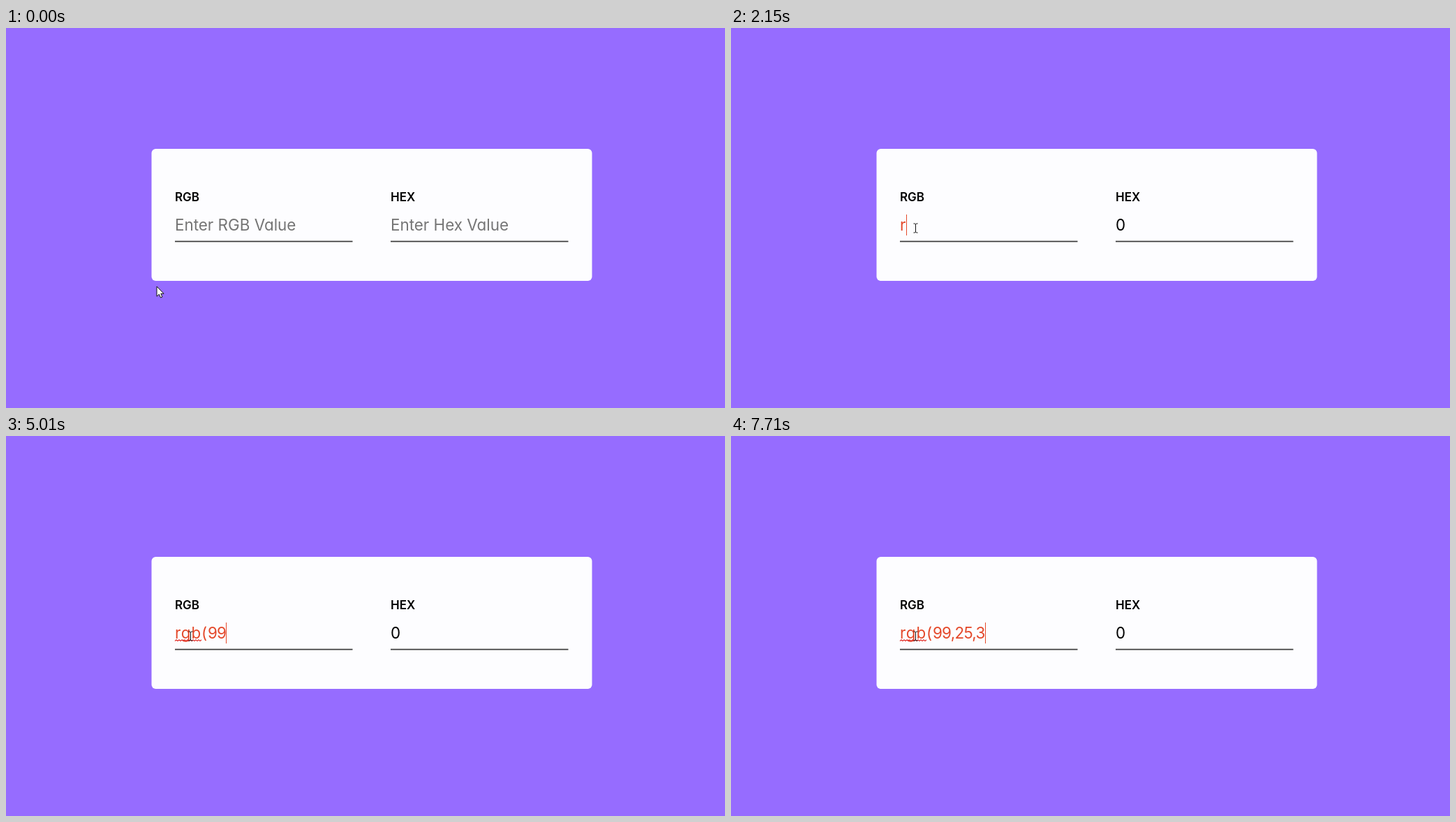
Animation, 1030 px wide and 544 px high, one loop 8 s. Source, as an HTML page:

```html
<!DOCTYPE html>
<html lang="en">
<head>
<meta charset="utf-8">
<title>RGB to hex converter</title>
<style>
  html, body { margin: 0; width: 100%; height: 100%; overflow: hidden; background: #966cff; }
  svg { display: block; width: 1030px; height: 544px; }
  text { font-family: Inter, "Open Sans", sans-serif; font-feature-settings: "cv11"; white-space: pre; }
  .label { font-size: 17px; font-weight: 600; fill: #000; }
  .value { font-size: 22.4px; fill: #000; }
  .placeholder { fill: #757575; }
  .invalid { fill: #e4492b; }
  #prefix { letter-spacing: .8px; }
  #digits { letter-spacing: -.7px; }
</style>
</head>
<body>
<svg viewBox="0 0 1030 544">
  <rect width="1030" height="544" fill="#966cff"/>
  <rect x="208.5" y="173" width="631" height="189" rx="6" fill="#fdfdff"/>
  <text class="label" x="242" y="248">RGB</text>
  <text class="label" x="551" y="248">HEX</text>
  <g fill="#3a3a3a">
    <rect x="242" y="304.7" width="254.5" height="1.7"/>
    <rect x="551" y="304.7" width="254.5" height="1.7"/>
  </g>
  <text id="rgbHint" class="value placeholder" x="242" y="290">Enter RGB Value</text>
  <text id="hexHint" class="value placeholder" x="551" y="290">Enter Hex Value</text>
  <text id="rgb" class="value invalid" x="242" y="290"><tspan id="prefix"></tspan><tspan id="digits"></tspan></text>
  <text id="hex" class="value" x="551" y="290">0</text>
  <path id="squiggle" fill="none" stroke="#e3342f" stroke-width="1.2"/>
  <rect id="caret" y="267" width="1" height="30"/>
  <path id="arrow" d="M0 0V14.2L3.3 11.2L5.5 16L7.9 15L5.8 10.3H10Z" fill="#fff" stroke="#111" stroke-width="1"/>
  <path id="beam" d="M-3 -6.5H-1L0 -5.5L1 -6.5H3M0 -5.5V5.5M-3 6.5H-1L0 5.5L1 6.5H3" fill="none" stroke="#111" stroke-width="1"/>
</svg>
<script>
const LOOP = 8000, LEFT = 242, FULL_TEXT = 'rgb(99,25,3';
const KEY_TIMES = [2110, 2360, 2690, 3490, 4670, 5010, 5980, 6440, 6740, 7120, 7620];
const FOCUS_TIME = 1140, SPELLCHECK_TIME = 4460, BLINK = 530;
const MOVE_START = 130, MOVE_STEP = 42, MOVE_END = 720;
const POINTER_PATH = [[88, 216, 370], [550, 267, 279.5], [718, 264, 286.5]];

const el = Object.fromEntries([...document.querySelectorAll('[id]')].map(node => [node.id, node]));
const show = (node, visible) => node.setAttribute('visibility', visible ? 'visible' : 'hidden');
const place = (node, x, y) => node.setAttribute('transform', `translate(${x} ${y})`);
const ease = p => p * p * (3 - 2 * p);

el.squiggle.setAttribute('d', 'M242 293.5' + Array.from({ length: 19 },
  (_, i) => `L${244 + i * 2} ${i % 2 ? 293.5 : 291.7}`).join(''));

function pointerAt(time) {
  if (time < MOVE_START) return POINTER_PATH[0].slice(1);
  const steps = Math.floor((Math.min(time, MOVE_END) - MOVE_START) / MOVE_STEP);
  const t = MOVE_START + steps * MOVE_STEP;
  const [from, to] = t < POINTER_PATH[1][0] ? POINTER_PATH : POINTER_PATH.slice(1);
  const p = ease(Math.min(1, (t - from[0]) / (to[0] - from[0])));
  return [1, 2].map(i => Math.round((from[i] + (to[i] - from[i]) * p) * 2) / 2);
}

function drawPointer(time) {
  const [x, y] = pointerAt(time);
  const overInput = y < 307 && x > LEFT;
  show(el.arrow, !overInput);
  show(el.beam, overInput);
  place(el.arrow, x, y);
  place(el.beam, x + .5, y);
}

function drawField(time) {
  const pressed = KEY_TIMES.filter(key => key <= time);
  const typed = FULL_TEXT.slice(0, pressed.length);
  const hasText = typed.length > 0;
  el.prefix.textContent = typed.slice(0, 4);
  el.digits.textContent = typed.slice(4);
  show(el.rgbHint, !hasText);
  show(el.hexHint, !hasText);
  show(el.hex, hasText);
  show(el.squiggle, time >= SPELLCHECK_TIME);

  const blinkStart = hasText ? pressed.at(-1) : FOCUS_TIME;
  const phase = Math.floor((time - blinkStart) / (BLINK + 10));
  show(el.caret, time >= FOCUS_TIME && phase % 2 === 0);
  const width = hasText ? el.rgb.getComputedTextLength() : 0;
  el.caret.setAttribute('x', Math.round(LEFT + width));
  el.caret.setAttribute('fill', hasText ? '#e4492b' : '#000');
}

function render(now) {
  const time = now % LOOP;
  drawPointer(time);
  drawField(time);
}

const start = performance.now();
function tick() {
  render(performance.now() - start);
  requestAnimationFrame(tick);
}
tick();
</script>
</body>
</html>
```
